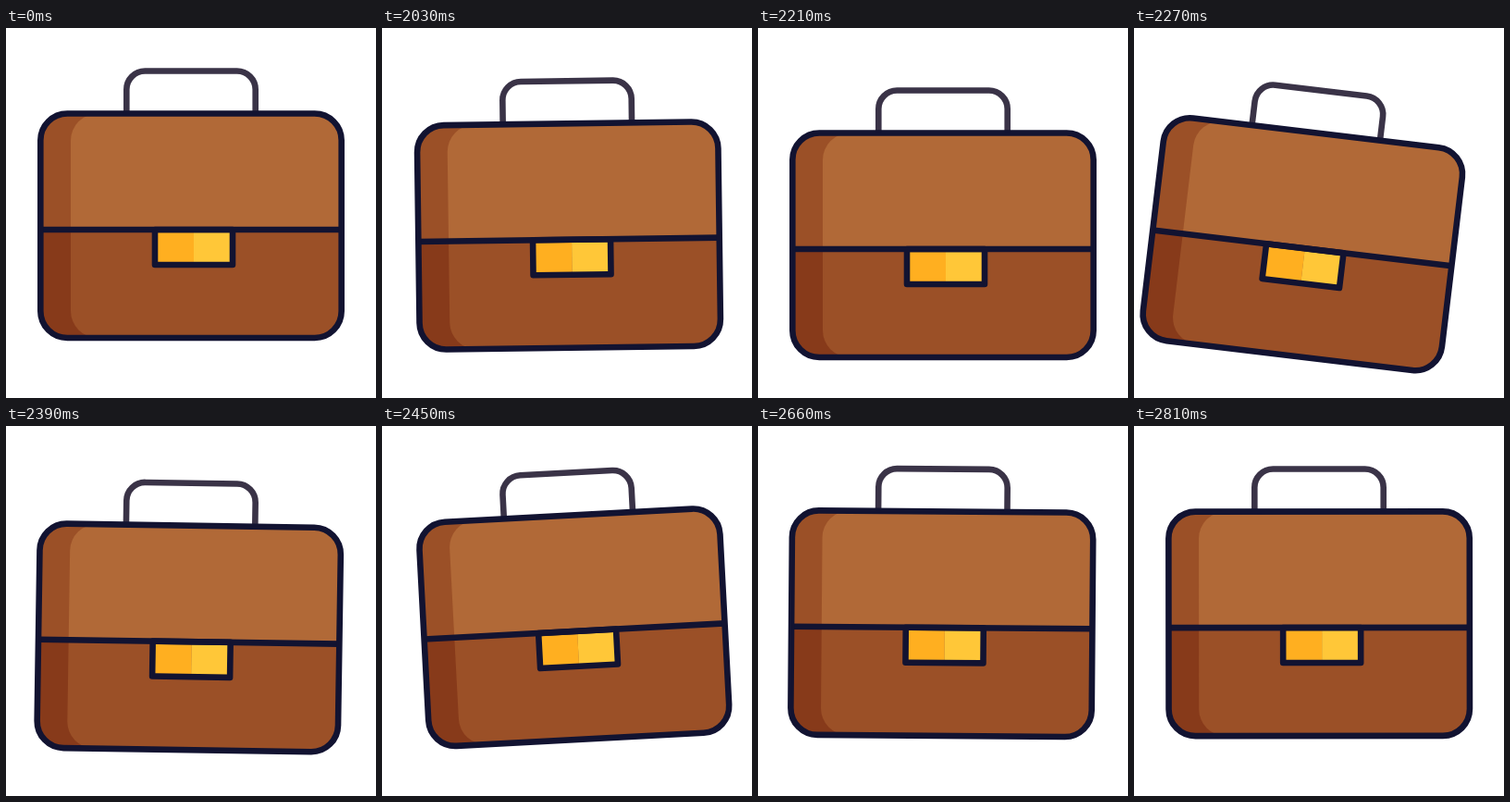
Recreate the animation shown at these times as an HTML page. Size 400 by 400 pixels, loop 2.84 s.

```html
<!DOCTYPE html>
<html lang="en">
<head>
<meta charset="utf-8">
<title>Briefcase</title>
<style>
  html, body { margin: 0; width: 100%; height: 100%; overflow: hidden; background: #fff; }
  svg { display: block; width: 100%; height: 100%; }
</style>
</head>
<body>
<svg viewBox="0 0 400 400">
  <defs>
    <clipPath id="body"><rect x="37.3" y="92.5" width="325.4" height="242.5" rx="29"/></clipPath>
  </defs>
  <g id="case">
    <path d="M130.3 94V66.5a20 20 0 0 1 20-20h99.4a20 20 0 0 1 20 20V94" fill="none" stroke="#3a3347" stroke-width="6.6"/>
    <g clip-path="url(#body)">
      <rect x="34" y="89" width="332" height="129" fill="#9b5027"/>
      <rect x="34" y="218" width="332" height="121" fill="#873a1a"/>
      <path d="M70 218V121.5a29 29 0 0 1 29-29H366V218Z" fill="#b16937"/>
      <path d="M70 218V306a29 29 0 0 0 29 29H366V218Z" fill="#9b5027"/>
    </g>
    <rect x="161" y="218" width="42" height="38" fill="#ffaf20"/>
    <rect x="203" y="218" width="42" height="38" fill="#ffc738"/>
    <g fill="none" stroke="#121331" stroke-width="6.6" stroke-linejoin="round">
      <rect x="161" y="218" width="84" height="38"/>
      <path d="M37.3 218H362.7"/>
      <rect x="37.3" y="92.5" width="325.4" height="242.5" rx="29"/>
    </g>
  </g>
</svg>
<script>
  const LOOP = 2840, START = 2000, STEP = 30;
  const PIVOT_Y = 65, DROP = 21;
  const briefcase = document.getElementById('case');

  // [ms after START, degrees] at the turning points of the swing
  const swing = [[0, 0], [140, -7], [280, 7], [480, -3.6], [595, 2.1], [715, -0.8], [830, 0]];

  const clamp = x => Math.min(1, Math.max(0, x));
  const easeInOut = x => (1 - Math.cos(Math.PI * clamp(x))) / 2;
  const easeOut = x => 1 - (1 - clamp(x)) ** 3;

  function angleAt(t) {
    const next = swing.findIndex(([time]) => time > t);
    if (next < 1) return 0;
    const [t0, a0] = swing[next - 1];
    const [t1, a1] = swing[next];
    return a0 + (a1 - a0) * easeInOut((t - t0) / (t1 - t0));
  }

  const dropAt = t => DROP * (easeOut(t / 140) - easeInOut((t - 330) / 170));

  function draw(now) {
    const elapsed = Math.max(0, now % LOOP - START);
    const t = Math.floor(elapsed / STEP) * STEP;
    briefcase.setAttribute('transform',
      `translate(0 ${dropAt(t)}) rotate(${angleAt(t)} 200 ${PIVOT_Y})`);
  }

  const origin = performance.now();
  function tick() {
    draw(performance.now() - origin);
    requestAnimationFrame(tick);
  }
  tick();
</script>
</body>
</html>
```
